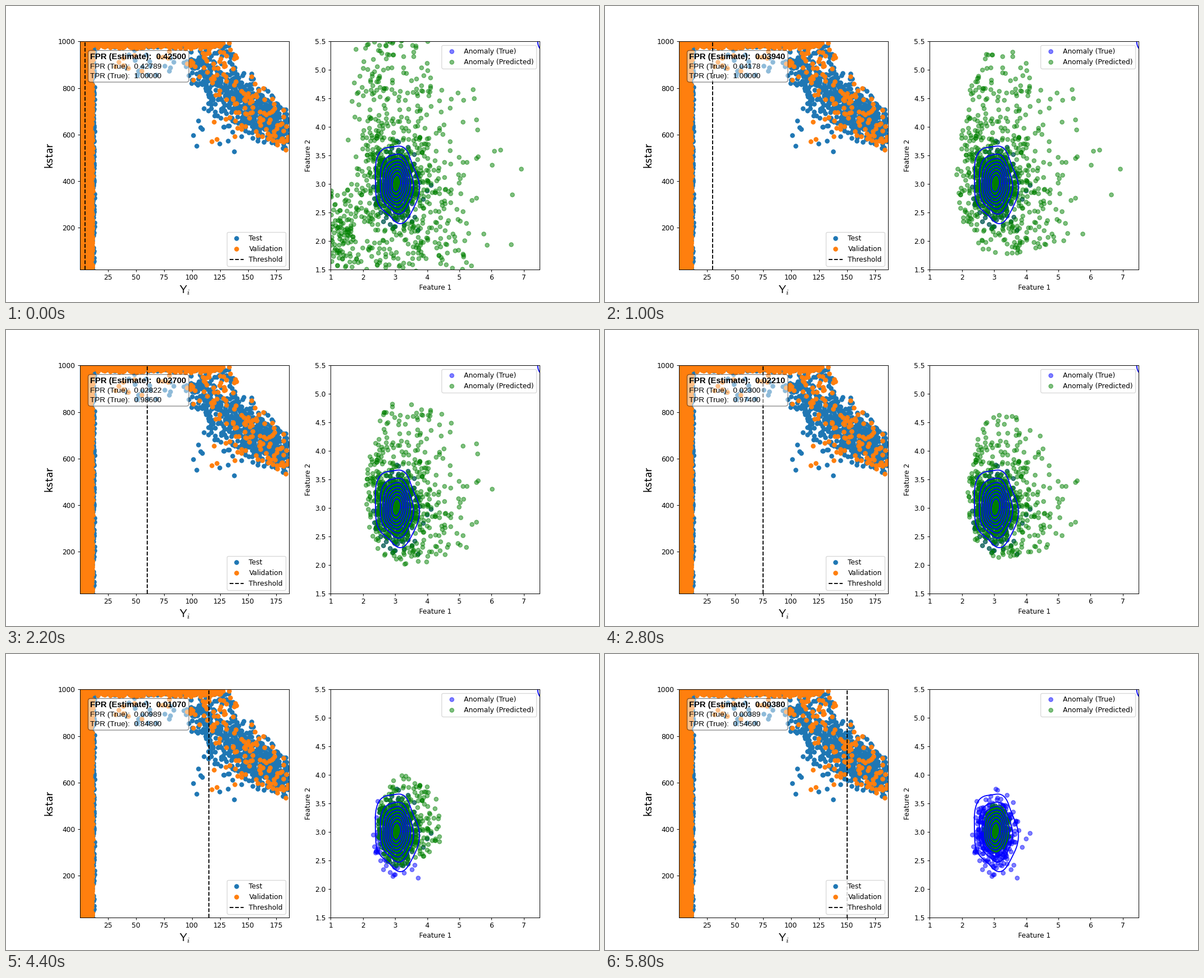
Animation of 1058 by 529 pixels, one loop 6 s. Source, as a matplotlib script:

```python
import numpy as np
import matplotlib.pyplot as plt
from matplotlib.animation import FuncAnimation
from matplotlib.patches import FancyBboxPatch
from matplotlib.transforms import IdentityTransform

FRAMES, STEP_MS = 30, 200
W, H = 1058, 529
CENTER = np.array([3.1, 3.05])
rng = np.random.default_rng(7)

# key thresholds and the rates reached there
KEYS = [5, 15, 45, 75, 100, 130, 150]
FPR_EST = [.425, .047, .033, .0221, .015, .0076, .0038]
FPR_TRUE = [.42789, .05044, .03467, .023, .01478, .00656, .00389]
TPR_TRUE = [1, 1, 1, .974, .928, .774, .546]


def rate(values, t, samples):
    """Interpolate on a log scale, rounded to whole samples."""
    v = np.exp(np.interp(t, KEYS, np.log(values)))
    return f"{round(v * samples) / samples:.5f}"


def cloud(n, mean, std):
    return rng.normal(mean, std, (n, 2))


def box(n, x0, x1, y0, y1):
    return rng.uniform((x0, y0), (x1, y1), (n, 2))


def detected(p, t):
    """Inside the region that shrinks as the threshold rises."""
    spill = 40 / t ** 2
    left = down = 1.45 - .007 * t + spill
    up = 2.7 - .015 * t + 2 * spill
    right = 4.9 - .0302 * t + 2 * spill
    dx, dy = (p - CENTER).T
    rx = np.where(dx < 0, left, right)
    ry = np.where(dy < 0, down, up)
    return (dx / rx) ** 2 + (dy / ry) ** 2 < 1


def make_normals():
    band = np.column_stack([rng.normal(2.85, .72, 330),
                            rng.uniform(1.45, 5.55, 330)])
    x, y = band.T
    band = band[(x > 1.65) | (y < 3)]
    right = np.column_stack([3.6 + rng.exponential(.9, 160),
                             rng.normal(3.3, .9, 160)])
    return np.vstack([band, right,
                      cloud(75, (2.35, 3.6), (.25, .5)),
                      cloud(50, (1.3, 2.1), (.25, .25)),
                      box(50, 1, 1.7, 1.5, 2.9),
                      box(45, 1.6, 2.5, 1.5, 3.2),
                      box(30, 3.4, 5.4, 1.5, 2.2),
                      cloud(130, CENTER, .29)])


def make_scores(n_band, edge, n_top, n_tail, n_upper, n_mid, n_low):
    """Left band, top strip and falling tail of the score plot."""
    band = np.column_stack([edge * rng.beta(1, 1.4, n_band),
                            rng.uniform(15, 1000, n_band)])
    top = np.column_stack([10 + 118 * rng.beta(1, 1.15, n_top),
                           1000 - 32 * rng.beta(1, 2.3, n_top)])
    x = 186 - 78 * rng.beta(1.1, 1.6, n_tail)
    y = 860 - 2.9 * (x - 100) + rng.normal(0, 62, n_tail)
    tail = np.vstack([np.column_stack([x, y]),
                      box(n_upper, 98, 140, 810, 1000)])
    x, y = tail.T
    tail = tail[(y > 805 - 1.5 * x) & (y < 1740 - 5.6 * x)]
    return np.vstack([band, top, tail, box(n_mid, 30, 105, 850, 975),
                      box(n_low, 100, 148, 520, 680)])


def draw_contours(ax):
    a = np.linspace(0, 2 * np.pi, 361)
    swell = .07 * np.cos(2 * (a - 2.41)) + .05 * np.cos(5 * (a - 2.41))
    for k, p in enumerate(np.linspace(.05, 1, 9)[:-1]):
        tilt = .015 * k * np.cos(2 * (a - 1.1))
        r = .275 * np.sqrt(-2 * np.log(p)) * (1 + swell * .75 ** k + tilt)
        ax.plot(3.04 + r * np.cos(a), 3.01 + r * np.sin(a), "b", lw=1.5)
    ax.plot(7.6 + .16 * np.cos(a), 5.5 + .15 * np.sin(a), "b", lw=1.5)


plt.rcParams.update({"font.family": "DejaVu Sans", "font.size": 10})
fig, (ax, bx) = plt.subplots(1, 2, figsize=(12, 6), dpi=W / 12)

# score plot
test = make_scores(2200, 13.4, 220, 500, 85, 28, 12)
valid = make_scores(4500, 11.6, 480, 100, 42, 14, 5)
ax.scatter(*test.T, color="tab:blue", label="Test")
ax.scatter(*valid.T, color="tab:orange", label="Validation")
line = ax.axvline(5, color="k", ls="--", label="Threshold")
ax.set(xlim=(.4, 186.5), ylim=(20, 1000), xticks=range(25, 176, 25),
       yticks=range(200, 1001, 200))
ax.set_xlabel(r"$\mathsf{Y}_i$", fontsize=16, math_fontfamily="cm")
ax.set_ylabel(r"$\mathsf{kstar}$", fontsize=18, math_fontfamily="cm")
ax.legend(loc="lower right")

ax.add_patch(FancyBboxPatch((150.9, H - 131.6), 171, 47.7,
                            boxstyle="round,pad=4.4", fc="white", ec="black",
                            alpha=.5, zorder=3, transform=IdentityTransform()))


def note(y, size, weight="normal"):
    return ax.text(150.4, H - y, "", fontsize=size, weight=weight, zorder=4,
                   family="Liberation Sans", transform=IdentityTransform())


est_note, fpr_note, tpr_note = note(95, 12, "bold"), note(112, 11), note(129, 11)

# feature plot
anomalies, normals = cloud(500, (3.03, 3.0), .29), make_normals()
points = np.vstack([normals, anomalies])
bx.scatter(*anomalies.T, color="blue", alpha=.5, label="Anomaly (True)")
found = bx.scatter([], [], color="green", alpha=.5, label="Anomaly (Predicted)")
draw_contours(bx)
bx.set(xlim=(1, 7.5), ylim=(1.5, 5.5), xticks=range(1, 8),
       yticks=np.arange(1.5, 5.6, .5), xlabel="Feature 1", ylabel="Feature 2")
bx.legend(loc="upper right")


def draw(i):
    t = 5 * (i + 1)
    line.set_xdata([t, t])
    est_note.set_text(f"FPR (Estimate):  {rate(FPR_EST, t, 10000)}")
    fpr_note.set_text(f"FPR (True):  {rate(FPR_TRUE, t, 9000)}")
    tpr_note.set_text(f"TPR (True):  {rate(TPR_TRUE, t, 500)}")
    found.set_offsets(points[detected(points, t)])
    return line, est_note, fpr_note, tpr_note, found


anim = FuncAnimation(fig, draw, frames=FRAMES, interval=STEP_MS, repeat=True,
                     repeat_delay=0, blit=False)
plt.show()
```
